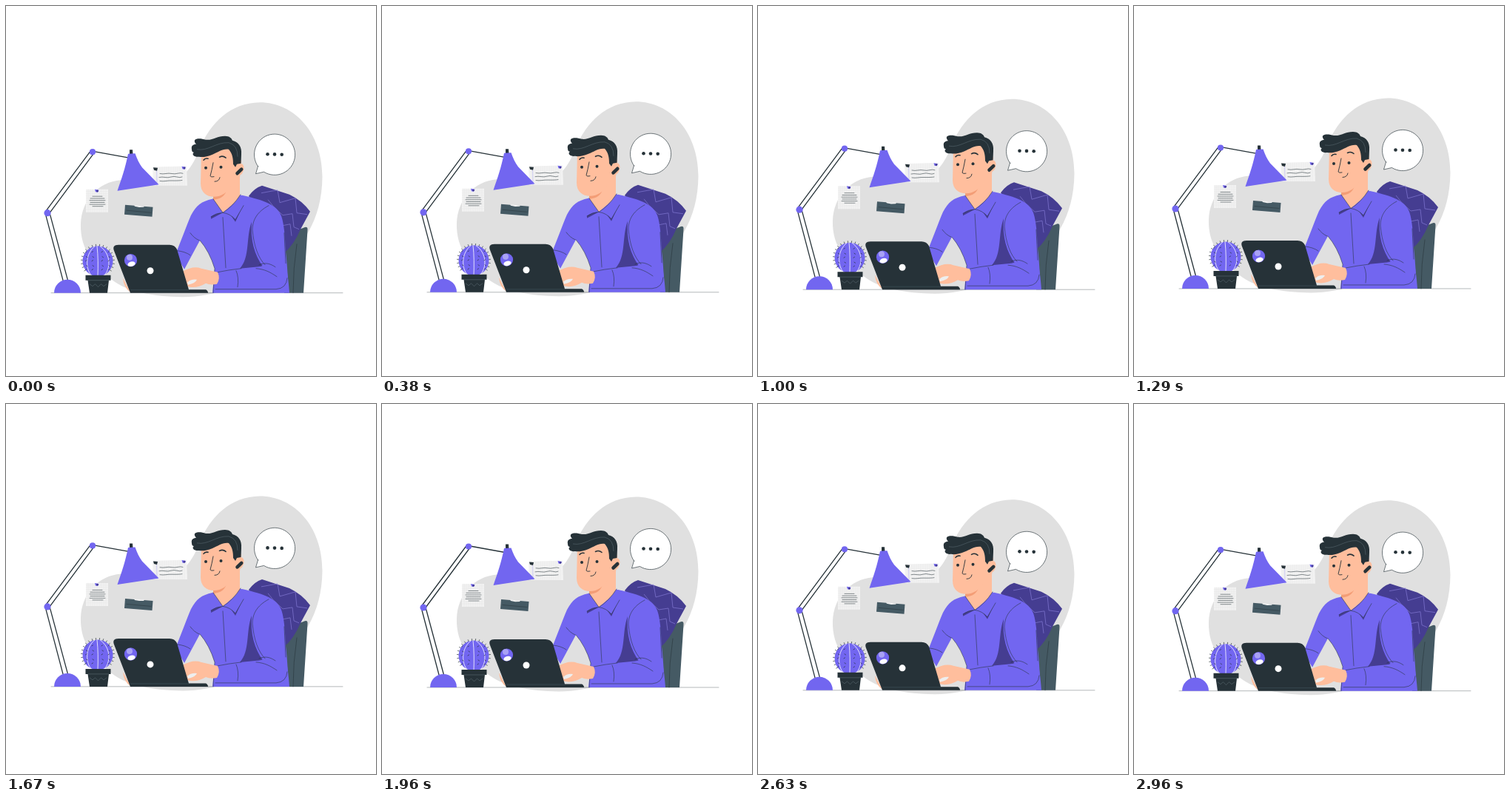
Animation of 500 by 500 pixels, one loop 3000 ms. Source, as an HTML page:

```html
<!DOCTYPE html>
<html lang="en">
<head>
<meta charset="utf-8">
<title>Desk worker</title>
<style>
html, body { margin: 0; height: 100%; overflow: hidden; background: #fff; }
svg { display: block; width: 100vw; height: 100vh; }
.p { fill: #7266f0; }
.k { fill: #263238; }
.s { fill: #ffbe9d; }
.d { fill: #453d91; }
.w { fill: #fff; }
.g { fill: #455a64; }
.l { fill: none; stroke: #263238; stroke-linecap: round; stroke-linejoin: round; }
.t { stroke-width: .55; }
</style>
</head>
<body>
<svg viewBox="0 0 500 500">
<g id="scene">
  <path fill="#e0e0e0" d="M343 130.5C390 130.500 427.500 172 427.500 231C427 290 400 330 360 354C322 377 280 394 238 393.500C200 393 165 386 147 373C120 353 100 330 101 295C102 262 125 238 155 235.500C185 233 200 241 225 236C243 231 254 214 262 192C277 158 303 131 343 130.500Z"/>
  <path class="l" stroke-width=".35" d="M61 388H455"/>

  <!-- wall notes -->
  <path fill="#f2f2f2" d="M108 248H138V279H108ZM198 218L244 216.500L245 243L199 243Z"/>
  <g id="grid" fill="none" stroke="#e3e3e3" stroke-width=".4"></g>
  <path class="l t" d="M117 257.500H130M114 260.300H133M113 263H134M114 265.700H133M113 268.400H134M117 271H131"/>
  <path class="l t" d="M208 226.800q4 .8 8 0t8 0t8-.3t7 0M207 231.800q4-.8 8 0t8-.5t8 0t7 0M208 236.800q4 .6 8 0t8-.5t8 0t6-.5"/>
  <path fill="none" stroke="#a9a4ee" stroke-width=".5" d="M203.500 219L204 243"/>
  <path class="k" d="M199 218.500L205 219L204 223L200 222Z"/>
  <path class="p" d="M120 248L125.500 249L124 252L121 251.500ZM237.500 217L243 218L241.500 221L238.500 220.500Z"/>
  <circle class="d" cx="123.500" cy="250.300" r="1.400"/><circle class="d" cx="241" cy="219.300" r="1.400"/>
  <path class="g" d="M161 269L198.500 272L197.500 285L160 282Z"/>
  <path fill="#f2f2f2" d="M173 269.500L187 270.700L186 272L180 272.200L174 271Z"/>
  <path class="l" stroke-width=".5" d="M163 276.500L196 279.500"/>

  <!-- lamp -->
  <path class="l" stroke-width="1.300" d="M53.500 282L77 371M59.500 282L83.500 371M53.500 278L114.500 196M59 280L119 199M119 197L166 205.500"/>
  <path class="p" d="M65 388A18 18 0 0 1 101 388Z"/>
  <circle class="p" cx="56" cy="280" r="4.600"/><circle class="p" cx="117" cy="197.500" r="4.100"/>
  <path class="k" d="M167 194.500H171L171.500 201H167Z"/>
  <path class="p" d="M165 200L174.500 199.500C177 207 180 213 184 218.500L206.500 241.500L150.500 250C156 234 161 220 165 200Z"/>

  <!-- cactus -->
  <path id="spikes" class="l" stroke-width=".7"/>
  <circle class="p" cx="124" cy="345" r="20.500"/>
  <path fill="none" stroke="#fff" stroke-width=".8" d="M120 325C107 335 107 356 116 365M123 324.500C124.500 338 124.500 352 124 365M127 325C142 335 142 356 132 365"/>
  <path id="marks" class="l" stroke-width=".7"/>
  <path class="k" d="M107.500 364H141.500V371H139L137 388H113L110.500 371H107.500Z"/>
  <path fill="none" stroke="#64757d" stroke-width=".5" d="M111 371H139M113 376l4 3l3.500-3l4 4l4-4l3.500 3l4-3"/>

  <!-- chair and cushion -->
  <path class="g" d="M376 310L402 300Q408 297 407.500 303L402 388H376Z"/>
  <path class="l t" d="M393 322Q388 355 388 388"/>
  <path class="d" d="M346 243L383 255Q400 263 411 278L398 302Q389 323 376 334L328 257Q336 246 346 243Z"/>
  <path fill="none" stroke="#8d83df" stroke-width=".6" d="M345 253L367 249L370 266L391 260L393 280L407 282M354 262L362 272L374 283L387 281L389 299L396 302M374 297L384 295L386 311"/>

  <!-- torso and arms -->
  <path class="p" d="M279 261C264 264 257 270 250 283C244 297 236 319 229 336L241 356L262 317Q275 332 282 355L279 388H383C382 372 380 360 378 347C378 325 377 298 372 284C366 269 350 263 319 256Z"/>
  <path class="d" d="M332 292C324 313 330 340 316 355L347 352C336 337 330 317 332 292Z"/>
  <path class="p" d="M286 361C310 357 338 357 349 350C338 334 331 313 332 292C336 274 356 268 369 282C377 315 380 345 381 371Q379 382 365 383H286Z"/>
  <path class="l t" d="M355 270C338 279 333 291 333 303C335 325 341 341 350 350M342 350C351 346 358 349 364 353M338 355C350 356 357 360 366 366M311 358Q315 367 313 380M286 360Q300 357 318 355M283 383H365Q379 382 380 368M376 307L378 348M293 286L297 354M249 307Q254 314 261 317M231 331Q242 332 249 337M262 317Q275 332 282 355L280 388"/>
  <path class="s" d="M280 252L280 263L293 279.500L316 260V225Z"/>
  <path fill="#f39d76" d="M280 257Q289 257 298 249Q295 261 280 262Z"/>
  <path class="d" d="M277 280L277 288L293 279.500ZM303 282L310 292L321 268Z"/>
  <path class="p" d="M280 261L293 279.500Q284 280 277 285Q274 271 280 261ZM317 255Q322 262 321 270L310 289Q303 281 293 279.500Q306 272 317 255Z"/>
  <path class="l t" d="M280 261L293 279.500Q284 280 277 285M317 255Q306 272 293 279.500Q303 281 310 289L321 270"/>

  <!-- head -->
  <path class="s" d="M264 198L263 240C263 252 271 258 281 258C291 258 300 252 306 241L316 232L318 210L308 188L280 188Z"/>
  <path class="s" d="M310 217Q321 209 321.500 219Q321 229 312 230Z"/>
  <path class="k" d="M251 194C250 189 253 187 257 187C250 179 261 178 270 181C280 182 285 176 296 176C302 176 305 179 306 182C314 184 319 190 318 201L317.500 213L312 214L310 218L307 214C307 206 306 200 301 194C292 193 287 198 279 201C272 204 265 205 261 204C255 205 250 201 254 198Q251 198 251 194Z"/>
  <path fill="none" stroke="#607078" stroke-width=".5" d="M258 194C273 197 284 184 301 185Q313 188 313 204"/>
  <path class="l" stroke-width="1.600" d="M267 208.500Q269 205.500 273 206.500M288.500 204.500Q293 202 297 205.500"/>
  <circle class="k" cx="270" cy="219" r="2"/><circle class="k" cx="290.500" cy="218" r="2"/>
  <path class="l" stroke-width=".9" d="M280 212Q278 223 276 230Q277 232 281 231M282 237.500Q288 237.500 289 232"/>
  <path class="l" stroke-width="4.600" d="M312.500 226.500L318.200 221"/>

  <!-- hands and laptop -->
  <path class="s" d="M158 368L168 387Q159 381 158 368Z"/>
  <path class="s" d="M238 359C248 354 256 352 264 355L286 360Q290 368 285 376Q276 378 270 375C262 380 252 382 245 379L240 372Z"/>
  <path fill="#eee" d="M245 374Q250 369 258 370Q256 375 246 377Z"/>
  <path class="k" d="M152 323H221Q228 323 231 329L247 383.500H270Q273 385 273 388H168L146 331Q143 323 152 323Z"/>
  <path fill="none" stroke="#455a64" stroke-width=".5" d="M168 384H247"/>
  <circle class="p" cx="168.500" cy="344" r="8.600"/>
  <circle fill="#a9a2f5" cx="167" cy="340" r="4"/>
  <ellipse class="w" cx="169.500" cy="349" rx="5.200" ry="3.200" transform="rotate(-14 169.500 349)"/>
  <circle class="w" cx="195" cy="358" r="4.500"/>

  <!-- speech bubble -->
  <path class="l" style="fill:#fff" stroke-width=".65" d="M340.500 217L337.500 227L348.500 224.500A27.600 27.600 0 1 0 340.500 217Z"/>
  <circle class="k" cx="353.500" cy="200.500" r="2.300"/><circle class="k" cx="363" cy="200.700" r="2.300"/><circle class="k" cx="372.700" cy="201" r="2.300"/>
</g>
</svg>
<script>
const el = id => document.getElementById(id);

let spikes = '';
for (let i = 0; i < 20; i++) {
  const a = Math.PI * (0.8 + 1.4 * i / 19), x = Math.cos(a), y = Math.sin(a);
  spikes += `M${124 + 20 * x} ${345 + 20 * y}l${2.6 * x} ${2.6 * y}`;
}
el('spikes').setAttribute('d', spikes);

let marks = '';
for (let r = 0; r < 5; r++)
  for (const x of [107.5, 116, 129, 138]) marks += `M${x + r % 2} ${333 + r * 6}l1.5 ${r % 2 ? 1 : -1}`;
el('marks').setAttribute('d', marks);

let grid = '';
for (let i = 1; i < 10; i++) grid += `<path d="M${108 + i * 3} 248v31M108 ${248 + i * 3}h30"/>`;
for (let i = 1; i < 15; i++) grid += `<path d="M${199 + i * 3} 217.500v25"/>`;
el('grid').innerHTML = grid;

// The whole scene floats up and back once per loop.
function draw() {
  const t = performance.now() % 3000 / 3000;
  const lift = 0.3 + 3 * (1 - Math.cos(2 * Math.PI * t));
  el('scene').setAttribute('transform', `translate(0 ${-lift})`);
  requestAnimationFrame(draw);
}
draw();
</script>
</body>
</html>
```
